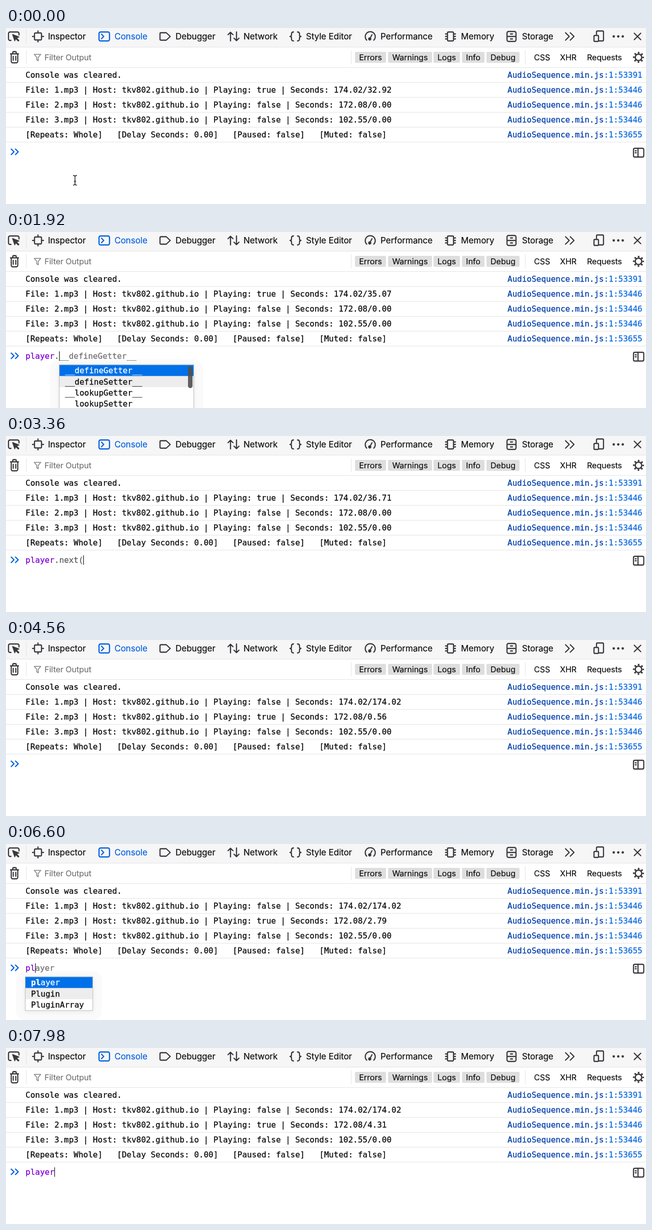
These frames come from a looping animation (1280x354 px, 8000 ms). An HTML page:

```html
<!DOCTYPE html>
<html lang="en">
<head>
<meta charset="utf-8">
<title>Console</title>
<style>
  html, body { margin: 0; width: 100%; height: 100%; overflow: hidden; background: #fff; }
  svg { display: block; }
  text { font-family: Inter, "Open Sans", sans-serif; font-size: 17px; fill: #0c0c0d; white-space: pre; }
  .small text { font-size: 16px; }
  text.mono, .mono text { font-family: "DejaVu Sans Mono", monospace; font-size: 16px; }
  text, tspan { stroke: currentColor; stroke-width: .2px; }
  .mono text, text.mono, .mono tspan, .mono > tspan { stroke-width: .3px; }
  .icon { fill: none; stroke: #38383d; stroke-width: 2.3; stroke-linecap: round; stroke-linejoin: round; }
  .line { stroke: #e3e3e5; }
  .blue { stroke: #0060df; }
  .solid { fill: #38383d; }
  .ink { color: #0c0c0d; fill: currentColor; }
  .active { color: #0060df; fill: currentColor; }
  .muted { color: #737373; fill: currentColor; }
  .dim { color: #5c5c5f; fill: currentColor; }
  .name { color: #8000d7; fill: currentColor; }
  .file { color: #003eaa; fill: currentColor; }
  .pos { color: #0a6ae0; fill: currentColor; }
  .white { color: #fff; fill: currentColor; }
</style>
</head>
<body>
<svg width="1280" height="354" viewBox="0 0 1280 354">
  <rect width="1280" height="354" fill="#fff"/>
  <rect width="1280" height="38" fill="#f6f6f7"/>
  <path class="line" d="M0 38.5H1280M0 79.5H1280M40.5 3V32M40.5 45V73M690.5 45V73M1038.5 45V73"/>

  <g class="icon">
    <path d="M10 25H8a3 3 0 0 1-3-3V11a3 3 0 0 1 3-3H23a3 3 0 0 1 3 3V14"/>
    <path class="solid" stroke-width="1.4" d="M13 13L26 18 21 20 26 25 24.500 26.500 19.500 21.500 17.500 26Z"/>
    <path d="M59 10H69a2 2 0 0 1 2 2V22a2 2 0 0 1-2 2H59a2 2 0 0 1-2-2V12a2 2 0 0 1 2-2ZM64 6V10M64 24V28M53 17H57M71 17H75"/>
    <g class="blue"><rect x="186" y="8" width="21" height="18" rx="3"/><path d="M191 12.500L195.500 17 191 21.500"/></g>
    <path d="M310 9.500H320.500L328.500 17 320.500 24.500H310a2 2 0 0 1-2-2V11.500a2 2 0 0 1 2-2Z"/>
    <path d="M449 26V9M444 13.500L449 8.500 454 13.500M461 8V25M456 20.500L461 25.500 466 20.500"/>
    <path d="M575 8q-4 0-4 4v2q0 3-3 3q3 0 3 3v2q0 4 4 4M583 8q4 0 4 4v2q0 3 3 3q-3 0-3 3v2q0 4-4 4"/>
    <path d="M721.500 24.500A10 10 0 1 1 735.500 24.500M728 21L732 13.500"/><circle class="solid" cx="727.500" cy="22" r="2"/>
    <path d="M885 8H893a2 2 0 0 1 2 2V24a2 2 0 0 1-2 2H885a2 2 0 0 1-2-2V10a2 2 0 0 1 2-2ZM879 12H882M879 17H882M879 22H882M896 12H899M896 17H899M896 22H899"/>
    <path d="M1005 7H1017a3 3 0 0 1 3 3V24a3 3 0 0 1-3 3H1005a3 3 0 0 1-3-3V10a3 3 0 0 1 3-3ZM1002 17H1020M1009 12H1013M1009 22H1013"/>
    <path d="M1119 9.500L1126.500 17 1119 24.500M1128.500 9.500L1136 17 1128.500 24.500"/>
    <path d="M1181 13V8a2 2 0 0 1 2-2H1193a2 2 0 0 1 2 2V24a2 2 0 0 1-2 2H1186"/><rect x="1176" y="15" width="9" height="12" rx="1.500"/>
    <path d="M1256.500 10.500L1269.500 23.500M1269.500 10.500L1256.500 23.500"/>
    <path d="M9 52H25M13.500 51V49.500a2 2 0 0 1 2-2H18.500a2 2 0 0 1 2 2V51M10.500 53V67a3 3 0 0 0 3 3H20.500a3 3 0 0 0 3-3V53M14.500 57V65M19.500 57V65"/>
    <path stroke="#85858a" stroke-width="1.600" d="M56.500 53H69.500L64.500 59V66L61.500 64V59Z"/>
    <circle cx="1265" cy="59" r="6.500" stroke-width="2.700"/>
    <circle cx="1265" cy="59" r="9.300" stroke-width="3.600" stroke-linecap="butt" stroke-dasharray="3.100 4.204" stroke-dashoffset="1.550"/>
  </g>
  <g class="solid"><circle cx="1215.500" cy="17" r="2.400"/><circle cx="1224.500" cy="17" r="2.400"/><circle cx="1233.500" cy="17" r="2.400"/></g>

  <g id="tabs"></g>
  <g id="filters" class="small"></g>
  <g id="rows" class="mono"></g>

  <g id="sent" class="mono">
    <path class="icon" style="stroke:#85858a" d="M10.500 243.500L16 249 10.500 254.500M19 243.500L24.500 249 19 254.500"/>
    <text x="39" y="254.500"><tspan class="name">player</tspan><tspan class="dim">.next()</tspan></text>
    <path class="line" d="M0 259.500H1280"/>
  </g>
  <g id="prompt">
    <path class="icon blue" d="M10.500 243.500L16 249 10.500 254.500M19 243.500L24.500 249 19 254.500"/>
    <g class="icon"><rect x="1255" y="242" width="20.500" height="17.500" rx="2.500"/><path d="M1264 242V259M1258.500 247H1260.500M1258.500 251H1260.500"/></g>
    <text class="mono" x="39" y="254.500"><tspan id="name" class="name"></tspan><tspan id="rest" class="dim"></tspan><tspan id="hint" class="muted"></tspan></text>
    <rect id="caret" y="240" width="1.300" height="19" fill="#222"/>
  </g>
  <g id="popup" class="mono"></g>
  <path id="pointer" fill="none" stroke="#222" stroke-width="1.500" d="M134 296.500Q138 296.500 138 299V313.500Q138 316 134 316M142 296.500Q138 296.500 138 299M138 313.500Q138 316 142 316M136 308.500H140"/>
</svg>
<script>
const $ = id => document.getElementById(id);
const LOOP = 8000, STEP = 60, CHAR = 9.632, LEFT = 39;
const SENT = 3960, NEXT = 4020;

const label = (x, y, s, cls = 'ink', attrs = '') =>
  `<text x="${x}" y="${y}" class="${cls}" ${attrs}>${s}</text>`;

$('tabs').innerHTML = [[84, 'Inspector'], [217, 'Console'], [339, 'Debugger'], [475, 'Network'],
  [600, 'Style Editor'], [749, 'Performance'], [910, 'Memory'], [1032, 'Storage']]
  .map(([x, s]) => label(x, 22.5, s, s === 'Console' ? 'active' : 'ink')).join('');

const button = ([x, w, s]) =>
  `<rect x="${x}" y="48" width="${w}" height="22" rx="2" fill="#dedede"/>` +
  label(x + w / 2, 64.5, s, 'ink', 'text-anchor="middle"');
$('filters').innerHTML = label(77, 64.5, 'Filter Output', 'muted') +
  [[698, 62, 'Errors'], [764, 88, 'Warnings'], [855, 53, 'Logs'], [912, 45, 'Info'], [961, 66, 'Debug']].map(button).join('') +
  [[1056, 'CSS'], [1108, 'XHR'], [1162, 'Requests']].map(([x, s]) => label(x, 64.5, s)).join('');

$('rows').innerHTML = [53391, 53446, 53446, 53446, 53655].map((pos, i) => {
  const y = 100 + 30 * i;
  return label(LEFT, y, '', 'ink', `id="log${i}"`) +
    label(1003, y, `<tspan class="file">AudioSequence.min.js</tspan><tspan class="pos">:1:${pos}</tspan>`) +
    `<path class="line" d="M0 ${y + 9.5}H1280"/>`;
}).join('');
$('log0').textContent = 'Console was cleared.';
$('log4').textContent = '[Repeats: Whole]   [Delay Seconds: 0.00]   [Paused: false]   [Muted: false]';

// Each entry: time, typed text, greyed completion, suggestions
const P = ['pageXOffset', 'pageYOffset', 'parent', 'parseFloat'];
const PL = ['player', 'Plugin', 'PluginArray'];
const MEMBERS = ['__defineGetter__', '__defineSetter__', '__lookupGetter__', '__lookupSetter__'];
const KEYS = [
  [0, ''],
  [540, 'p', 'ageXOffset', P], [660, 'pl', 'ayer', PL], [720, 'pla', 'yer'], [840, 'play', 'er'],
  [960, 'playe', 'r'], [1080, 'player'], [1740, 'player.', MEMBERS[0], MEMBERS],
  [2460, 'player.n', 'ext'], [2580, 'player.ne', 'xt'], [2760, 'player.nex', 't'], [2940, 'player.next'],
  [3240, 'player.next('], [3540, 'player.next()'], [SENT, ''],
  [6360, 'p', 'ageXOffset', P], [6480, 'pl', 'ayer', PL], [6840, 'pla', 'yer'], [7020, 'play', 'er'],
  [7260, 'playe', 'r'], [7500, 'player']
];

function popupMarkup(typed, items) {
  const prefix = typed.split('.').pop(), start = typed.length - prefix.length;
  const x = Math.round(LEFT + start * CHAR - 0.7), top = 267.5, rowH = 22.3;
  const long = items !== PL;
  const w = items === MEMBERS ? 270 : Math.max(...items.map(s => s.length)) * CHAR + 30;
  const h = long ? 200 : items.length * rowH + 1;
  const halo = `<rect x="${x - 18}" y="256" width="${w + 36}" height="${h + 30}" rx="18" fill="#000" fill-opacity=".02"/>`;
  const frame = `<rect x="${x + .5}" y="${top - .5}" width="${w - 1}" height="${h}" fill="#fff" stroke="#bcbcbc" style="filter:drop-shadow(0 2px 4px #0001)"/>`;
  const bands = ['#0070e8', '#ededed'].map((fill, i) =>
    `<rect x="${x + 1}" y="${top + i * rowH}" width="${w - 2}" height="${rowH}" fill="${fill}"/>`).join('');
  const words = items.map((s, i) => {
    const text = i ? s : `<tspan font-weight="bold">${prefix}</tspan>${s.slice(prefix.length)}`;
    return label(x + 12, top + 16.7 + i * rowH, text, i ? 'ink' : 'white');
  }).join('');
  const bar = long ? `<rect x="${x + w - 12}" y="270" width="9" height="44" rx="4.500" fill="#505050" fill-opacity=".9"/>` : '';
  return halo + frame + bands + words + bar;
}

// Playback position, running slightly faster than the clock
const FIRST = [[0, 32.92], [780, 33.83], [1920, 35.07], [3360, 36.71], [NEXT, 37.46]];
const SECOND = [[NEXT, 0], [4560, .56], [6600, 2.79], [7980, 4.31]];
function along(points, t) {
  const i = Math.max(1, points.findIndex(p => p[0] >= t));
  const [t0, a] = points[i - 1], [t1, b] = points[i];
  return a + (b - a) * (t - t0) / (t1 - t0);
}

const fileLine = (n, playing, total, at) =>
  `File: ${n}.mp3 | Host: tkv802.github.io | Playing: ${playing} | Seconds: ${total}/${at.toFixed(2)}`;
const show = (id, on) => $(id).setAttribute('display', on ? 'inline' : 'none');

let shownKey;
function draw(now) {
  const t = Math.floor(now % LOOP / STEP) * STEP;
  const second = t >= NEXT;
  $('log1').textContent = fileLine(1, !second, '174.02', second ? 174.02 : along(FIRST, t));
  $('log2').textContent = fileLine(2, second, '172.08', second ? along(SECOND, t) : 0);
  $('log3').textContent = fileLine(3, false, '102.55', 0);

  const key = KEYS.filter(k => k[0] <= t).pop();
  const [since, typed, hint = '', items] = key;
  if (key !== shownKey) {
    shownKey = key;
    $('name').textContent = typed.slice(0, 6);
    $('rest').textContent = typed.slice(6);
    $('hint').textContent = hint;
    $('caret').setAttribute('x', LEFT + typed.length * CHAR - .2);
    $('popup').innerHTML = items ? popupMarkup(typed, items) : '';
  }
  show('caret', since > 0 && Math.floor((t - since) / 510) % 2 === 0);
  show('pointer', t < KEYS[1][0]);

  const pending = t >= SENT && t < NEXT;
  show('sent', pending);
  $('prompt').setAttribute('transform', `translate(0 ${pending ? 30 : 0})`);
}

const began = performance.now();
function tick() {
  draw(performance.now() - began);
  requestAnimationFrame(tick);
}
tick();
</script>
</body>
</html>
```
